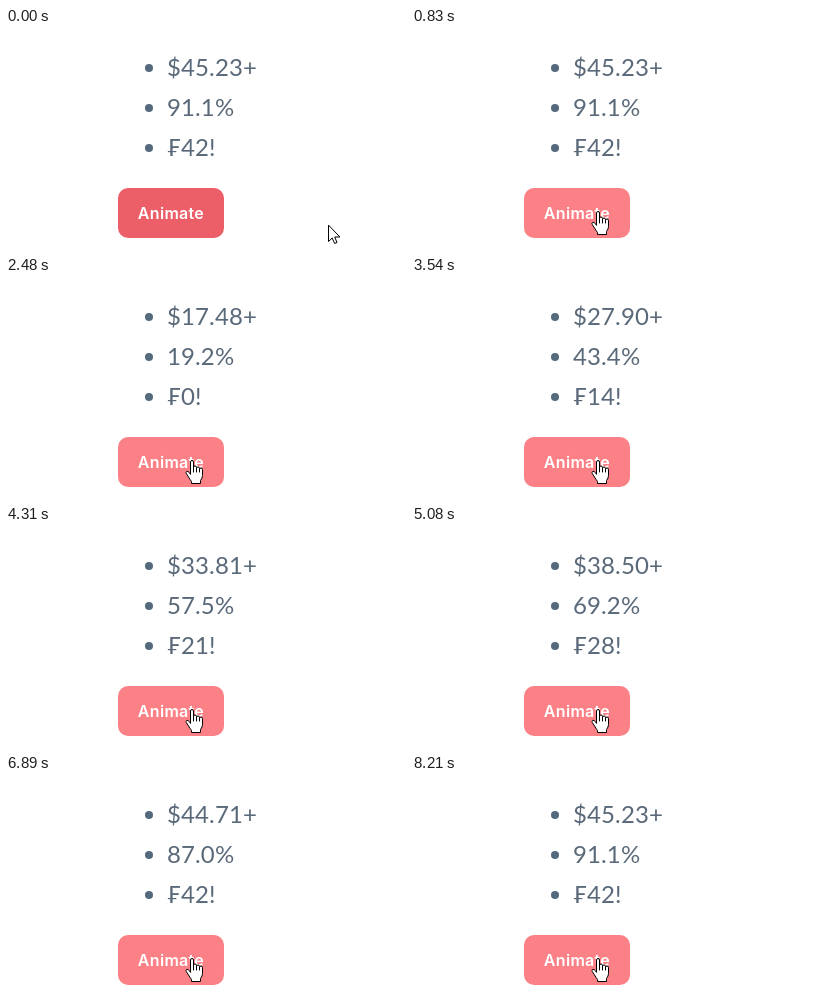
Write an HTML page that moves like this. It is 400x221 px and loops after 8.75 s.

```html
<!DOCTYPE html>
<html lang="en">
<head>
<meta charset="utf-8">
<title>Animated numbers</title>
<style>
  html, body { margin: 0; width: 100%; height: 100%; overflow: hidden; background: #fff; }
  .stage { position: relative; width: 400px; height: 221px; overflow: hidden; }
  ul { position: absolute; left: 161px; top: 19px; margin: 0; padding: 0; list-style: none;
       font: 24px/40px Lato, sans-serif; letter-spacing: .12px; color: #5a6979; white-space: pre; }
  li { position: relative; height: 40px; }
  li::before { content: ""; position: absolute; left: -22px; top: 17px;
               width: 8px; height: 8px; border-radius: 50%; background: #55697d; }
  .button { position: absolute; left: 112px; top: 160px; width: 106px; height: 50px;
            border-radius: 10px; background: #ed5f68; color: #fff; text-align: center;
            font: 600 16px/50px Inter, sans-serif; letter-spacing: .3px;
            animation: hover 8750ms linear infinite; }
  .cursor { position: absolute; left: 0; top: 0; width: 24px; height: 28px; overflow: visible;
            animation: move 8750ms linear infinite; }
  .cursor path { fill: #fff; stroke: #000; stroke-linejoin: round; stroke-linecap: round; }
  .arrow { animation: arrow 8750ms step-end infinite; }
  .hand { animation: hand 8750ms step-end infinite; }
  @keyframes move {
    0%, .4% { transform: translate(322px, 197px); animation-timing-function: ease-in-out; }
    9.4%, 100% { transform: translate(185px, 183px); }
  }
  @keyframes hover {
    0%, 6.4% { background: #ed5f68; }
    8.2%, 100% { background: #fb8187; }
  }
  @keyframes arrow { 0% { opacity: 1; } 6.4%, 100% { opacity: 0; } }
  @keyframes hand { 0% { opacity: 0; } 6.4%, 100% { opacity: 1; } }
</style>
</head>
<body>
<div class="stage">
  <ul><li></li><li></li><li></li></ul>
  <div class="button">Animate</div>
  <svg class="cursor" viewBox="0 0 24 28">
    <path class="arrow" d="M.5.5V16.5L4.2 13 6.6 18.5 9 17.5 6.7 12H11.5Z"/>
    <g class="hand">
      <path d="M-.5 14V2Q-.5.5 1 .5T2.5 2V7.5Q2.5 6 4 6T5.5 7.5V8.5Q5.5 7 7 7T8.500 8.500V9.500Q8.500 8 10 8T11.500 9.800V15.500Q11.500 18 9.500 20.500V23.500H.5V21.500Q-1 19.500-2.500 17L-4.700 13.500Q-5.500 12-4.300 11.400-3 11-1.900 12.300Z"/>
      <path d="M2.500 7.500V12M5.500 8.500V12M8.500 9.500V12" fill="none"/>
    </g>
  </svg>
</div>
<script>
  const LOOP = 8750;
  const TICK = 10;
  // Clock of the first counter: [time in ms, progress]
  const clock = [[1071, 0], [1660, .09043], [2480, .21667], [3540, .38099],
                 [5080, .61425], [6890, .8928], [8200, 1.0816], [LOOP, 1.165]];
  const counters = [
    { lag: 0, end: 45.23, text: v => `$${v.toFixed(2)}+` },
    { lag: .1048, end: 91.1, text: v => `${v.toFixed(1)}%` },
    { lag: .2125, end: 42, text: v => `₣${Math.ceil(Math.round(v) / 7) * 7}!` }
  ];
  const rows = document.querySelectorAll("li");
  const easeOut = p => 1 - (1 - p) ** 2;

  function progress(t) {
    const i = clock.findIndex(k => t < k[0]);
    if (i < 1) return -1;
    const [t0, p0] = clock[i - 1], [t1, p1] = clock[i];
    return p0 + (p1 - p0) * (t - t0) / (t1 - t0);
  }

  function draw(t) {
    const now = progress(t);
    counters.forEach(({ lag, end, text }, i) => {
      const p = now - lag;
      const label = text(p < 0 ? end : end * easeOut(Math.min(p, 1)));
      if (rows[i].textContent !== label) rows[i].textContent = label;
    });
  }

  const start = performance.now();
  function tick() {
    const t = (performance.now() - start) % LOOP;
    draw(Math.floor(t / TICK) * TICK);
    requestAnimationFrame(tick);
  }
  tick();
</script>
</body>
</html>
```
